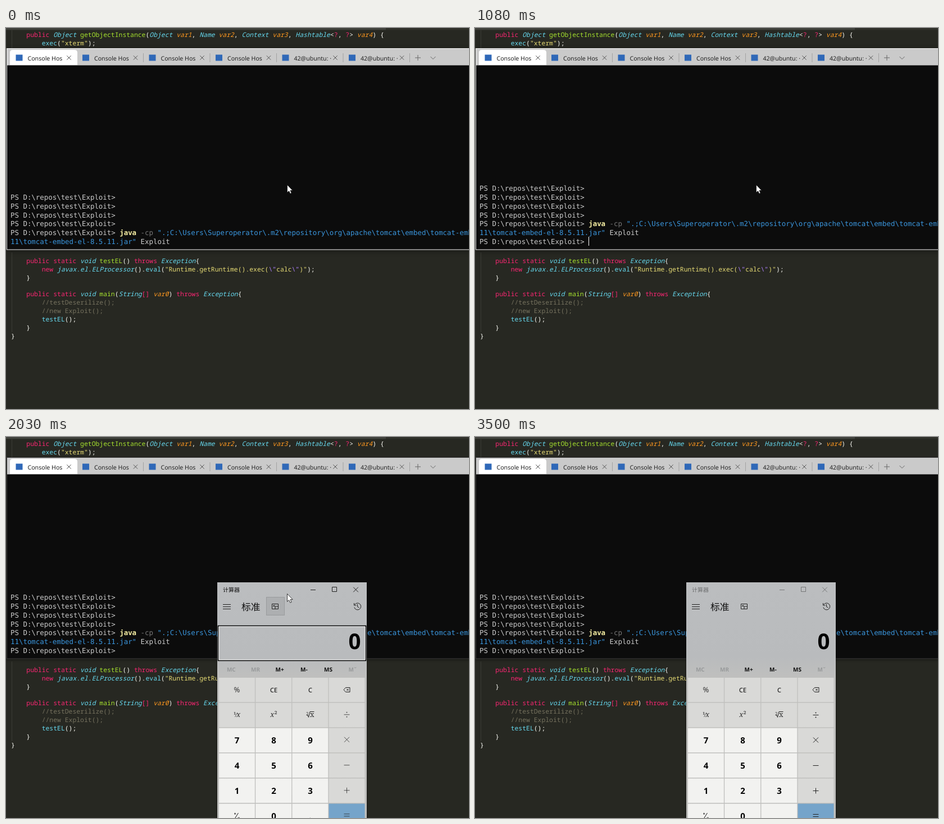
Write an HTML page that moves like this. It is 824 by 679 pixels and loops after 3.6 s.

```html
<!DOCTYPE html>
<html lang="en">
<head>
<meta charset="utf-8">
<title>Terminal and calculator</title>
<style>
html, body { margin: 0; width: 100%; height: 100%; overflow: hidden; background: #272822 }
svg { display: block; width: 824px; height: 679px; text-rendering: geometricPrecision }
text { white-space: pre; font-family: "Noto Sans", sans-serif }
.code { font: 11.42px "Noto Sans Mono", monospace; fill: #f8f8f2 }
.term { font: 12.41px "DejaVu Sans Mono", monospace; fill: #ccc }
.k { fill: #f92672 } .t { fill: #66d9ef; font-style: italic } .c { fill: #66d9ef }
.f { fill: #a6e22e } .v { fill: #fd971f; font-style: italic } .s { fill: #e6db74 }
.e { fill: #ae81ff } .n { fill: #75715e }
.cmd { fill: #f9f1a5; font-weight: 700 } .opt { fill: #767676 } .path { fill: #3a96dd }
.tab { font-size: 10.6px; fill: #222 }
.cjk { font-family: "Noto Sans CJK SC", "Noto Sans CJK", sans-serif; fill: #111 }
.mid { text-anchor: middle }
.math { font: 13px "Noto Serif", serif; fill: #333 }
.line { fill: none; stroke: #222; stroke-width: 1 }
</style>
</head>
<body>
<svg id="stage" viewBox="0 0 824 679" xmlns="http://www.w3.org/2000/svg"></svg>
<script>
const LOOP = 3600, ROW = 15.8;
const esc = s => s.replace(/&/g, '&amp;').replace(/</g, '&lt;');
const rect = (x, y, w, h, fill, more = '') => `<rect x="${x}" y="${y}" width="${w}" height="${h}" fill="${fill}" ${more}/>`;
const path = (d, more = '') => `<path class="line" d="${d}" ${more}/>`;
const text = (x, y, s, cls, more = '') => `<text x="${x}" y="${y}" class="${cls}" ${more}>${esc(s)}</text>`;
// Each part is "class|text"; an empty class keeps the base colour.
const spans = (x, y, base, parts) => `<text x="${x}" y="${y}" class="${base}">` + parts.map(p => {
  const cut = p.indexOf('|');
  return `<tspan class="${p.slice(0, cut)}">${esc(p.slice(cut + 1))}</tspan>`;
}).join('') + '</text>';
const code = (row, col, ...parts) => spans(8.9 + col * 6.85, 16 + row * 14.917, 'code', parts);
const term = (row, ...parts) => spans(8, 306 + row * ROW, 'term', parts);
const cross = (x, y, r) => `M${x - r} ${y - r}l${2 * r} ${2 * r}m0 ${-2 * r}l${-2 * r} ${2 * r}`;

function editor() {
  return rect(0, 0, 824, 679, '#272822') +
    rect(0, 0, 676, 3.5, '#41423d') + rect(676, 0, 148, 3.5, '#30312b') +
    path('M10.5 4V37M10.5 400V542', 'style="stroke:#3b3c35"') +
    code(0, 4, 'k|public ', 't|Object ', 'f|getObjectInstance', '|(', 't|Object ', 'v|var1', '|, ', 't|Name ', 'v|var2',
      '|, ', 't|Context ', 'v|var3', '|, ', 't|Hashtable', '|<', 'k|?', '|, ', 'k|?', '|> ', 'v|var4', '|) {') +
    code(1, 8, 'c|exec', '|(', 's|"xterm"', '|);') +
    code(27, 4, 'k|public static ', 't|void ', 'f|testEL', '|() ', 'k|throws ', 't|Exception', '|{') +
    code(28, 8, 'k|new ', 't|javax.el.ELProcessor', '|().', 'c|eval', '|(', 's|"Runtime.getRuntime().exec(',
      'e|\\"', 's|calc', 'e|\\"', 's|)"', '|);') +
    code(29, 4, '|}') +
    code(31, 4, 'k|public static ', 't|void ', 'f|main', '|(', 't|String', 'k|[] ', 'v|var0', '|) ', 'k|throws ', 't|Exception', '|{') +
    code(32, 8, 'n|//testDeserilize();') +
    code(33, 8, 'n|//new Exploit();') +
    code(34, 8, 'c|testEL', '|();') +
    code(35, 4, '|}') +
    code(36, 0, '|}');
}

function tab(i) {
  const x = 7 + i * 118.5;
  return (i ? '' : `<path d="M7 66V44q0-5 5-5H122q5 0 5 5V66z" fill="#fff"/>`) +
    rect(x + 10.5, 47.5, 12, 11, '#2f68b8') +
    text(x + 31.5, 57.5, i < 4 ? 'Console Hos' : '42@ubuntu: ·', 'tab') +
    path(cross(x + 105, 53, 3.7), 'style="stroke:#555"') +
    (i ? path(`M${x + 119} 45v16`, 'style="stroke:#a2a2a2"') : '');
}

function terminal() {
  const prompt = String.raw`|PS D:\repos\test\Exploit> `;
  return rect(1.5, 36.5, 830, 358.5, '#0c0c0c', 'id="frame"') +
    rect(2, 37, 822, 29.5, '#cacaca') +
    [0, 1, 2, 3, 4, 5].map(tab).join('') +
    path('M728 53h10M733 48v10M755.5 51l4.5 4.5 4.5-4.5', 'style="stroke:#666"') +
    '<g id="lines">' +
    [0, 1, 2, 3].map(r => term(r, prompt)).join('') +
    term(4, prompt, 'cmd|java ', 'opt|-cp ',
      String.raw`path|".;C:\Users\Superoperator\.m2\repository\org\apache\tomcat\embed\tomcat-embed`) +
    term(5, String.raw`path|11\tomcat-embed-el-8.5.11.jar"`, '| Exploit') +
    `<g id="lastPrompt">${term(6, prompt)}</g></g>` +
    rect(0, 372, 1, 16, '#fff', 'id="caret"');
}

function calculator() {
  const colX = [411, 476.5, 541.5, 606.5], rowY = r => 450.5 + r * 45;
  let keys = '', digits = '';
  for (let r = 0; r < 6; r++) for (let c = 0; c < 4; c++) {
    const fill = c == 3 && r == 5 ? '#75a4ca' : c == 3 || r < 2 ? '#d9d9d7' : '#f2f2f0';
    keys += rect(379 + c * 65.2, 429 + r * 44.9, 63.9, 43.4, fill);
  }
  ['789', '456', '123'].forEach((row, r) => [...row].forEach((d, c) => {
    digits += text(colX[c], rowY(r + 2) + 5.6, d, 'mid', 'font-size="15" font-weight="600"');
  }));
  digits += text(476.5, 681, '0', 'mid', 'font-size="15" font-weight="600"') +
    text(541.5, 681.5, '.', 'mid', 'font-size="15" font-weight="600"') +
    text(411, 679, '⁺∕₋', 'mid', 'font-size="13"');
  const signs = path(`M601.5 495.5h10${cross(606.5, 540, 4.5)}M601.5 585.5h10M601.5 630.5h10m-5-5v10M601.5 672.5h10m-10 4h10`) +
    '<g fill="#222"><circle cx="606.5" cy="491.5" r="1"/><circle cx="606.5" cy="499.5" r="1"/></g>';
  const functions =
    text(411, 455, '%', 'mid', 'font-size="13" fill="#333"') +
    text(476.5, 455, 'CE', 'mid', 'font-size="11"') + text(541.5, 455, 'C', 'mid', 'font-size="11"') +
    path('M601 450.5l3.5-4h7.5v8h-7.5z' + cross(608, 450.5, 1.8)) +
    '<text x="411" y="499" class="math mid"><tspan font-size="11">¹⁄</tspan><tspan font-style="italic">x</tspan></text>' +
    '<text x="476.5" y="499" class="math mid"><tspan font-style="italic">x</tspan>²</text>' +
    text(541, 499, 'x', 'math', 'font-style="italic"') +
    text(534, 496, '2', 'math', 'style="font-size:8px"') +
    path('M535 496l1.5-.8 2 4.3 2.5-10h7.5');
  const memory = ['MC', 'MR', 'M+', 'M-', 'MS', 'Mˇ'].map((s, i) =>
    text(400.8 + i * 43.2, 418, s, 'mid', `font-size="10" font-weight="600" fill="${i > 1 && i < 5 ? '#111' : '#989a9b'}"`)).join('');
  return `<g id="calc"><defs><linearGradient id="panel" x2="0" y2="1">
    <stop stop-color="#bbbdbf"/><stop offset=".3" stop-color="#b9bbbd"/><stop offset=".4" stop-color="#c0c0be"/><stop offset="1" stop-color="#bebebc"/>
    </linearGradient></defs>` +
    rect(376, 259, 266, 440, 'url(#panel)', 'style="filter:drop-shadow(0 1px 2px #0006)"') +
    '<g id="caption">' + text(386, 275.8, '计算器', 'cjk', 'font-size="10"') +
    path('M542 272.5h9M580.5 267.5h8v8h-8z' + cross(622.5, 272, 4.3)) + '</g>' +
    path('M386 298.5h14m-14 4h14m-14 4h14') +
    rect(463.5, 285.5, 32, 32, '#adafb1', 'id="hover" stroke="#999b9d"') +
    text(419, 308.5, '标准', 'cjk', 'font-size="16.8"') +
    path('M473.5 297.5h11v9h-11zM479 306v-4h5M476 300l3 3m-3-3h2.5m-2.5 0v2.5') +
    path('M620.5 299a6 6 0 1 1-.6 4.5M619.5 296v4h4M625.5 298v4.5l3 1.5') +
    '<g id="focus">' + path('M377.5 336.5h263v62h-263z', 'style="stroke:#000;stroke-width:1.6"') +
    path('M379 338h260v59h-260z', 'style="stroke:#eee"') + '</g>' +
    text(620.5, 377.5, '0', 'mid', 'font-size="38.5" font-weight="600"') +
    memory + keys + functions + `<g id="digits">${digits}</g><g id="signs">${signs}</g></g>`;
}

const pointer = '<path id="pointer" d="M0 0V13.8L3.1 11 5.3 15.8 7.6 14.8 5.5 10.1H9.7Z" fill="#fff" stroke="#111" stroke-width=".8"/>';
document.getElementById('stage').innerHTML = editor() + terminal() + calculator() + pointer;

const el = id => document.getElementById(id);
const show = (id, on) => el(id).setAttribute('display', on ? 'inline' : 'none');
const set = (id, name, value) => el(id).setAttribute(name, value);
// Last entry whose start time has passed.
const at = (t, steps) => steps.filter(s => s[0] <= t).pop().slice(1);

function draw(t) {
  const focused = t < 1350;
  set('frame', 'stroke', focused ? '#f4f4f4' : '#3c3c3c');
  el('frame').style.filter = `drop-shadow(0 2px ${focused ? 5 : 2}px #0006)`;
  set('lines', 'transform', `translate(0 ${t < 960 ? 0 : -ROW})`);
  show('lastPrompt', t >= 1080);
  show('caret', t >= 560 && focused);
  set('caret', 'x', at(t, [[0, 292], [960, 8], [1080, 202]])[0]);

  const opening = t < 2030, settling = t < 2180;
  show('calc', t >= 1910);
  set('calc', 'opacity', opening ? .69 : 1);
  set('calc', 'transform', opening ? 'translate(509 450) scale(.985) translate(-509 -450)' : '');
  set('digits', 'transform', `translate(0 ${settling ? -.5 : 0})`);
  set('signs', 'transform', `translate(0 ${settling ? -.7 : 0})`);
  set('signs', 'opacity', settling ? .75 : 1);
  set('hover', 'opacity', at(t, [[0, 0], [2030, 1], [2460, .5], [2580, 0]])[0]);
  show('focus', t < 3500);
  set('caption', 'opacity', t < 3500 ? 1 : .45);

  const [x, y] = at(t, [[0, 500.5, 279.5], [2460, 628, 426], [2580, 752, 572], [2730, 775, 615], [2850, 793, 656]]);
  set('pointer', 'transform', `translate(${x} ${y})`);
  show('pointer', t < 2970);
}

const start = performance.now();
function tick() {
  draw((performance.now() - start) % LOOP);
  requestAnimationFrame(tick);
}
tick();
</script>
</body>
</html>
```
